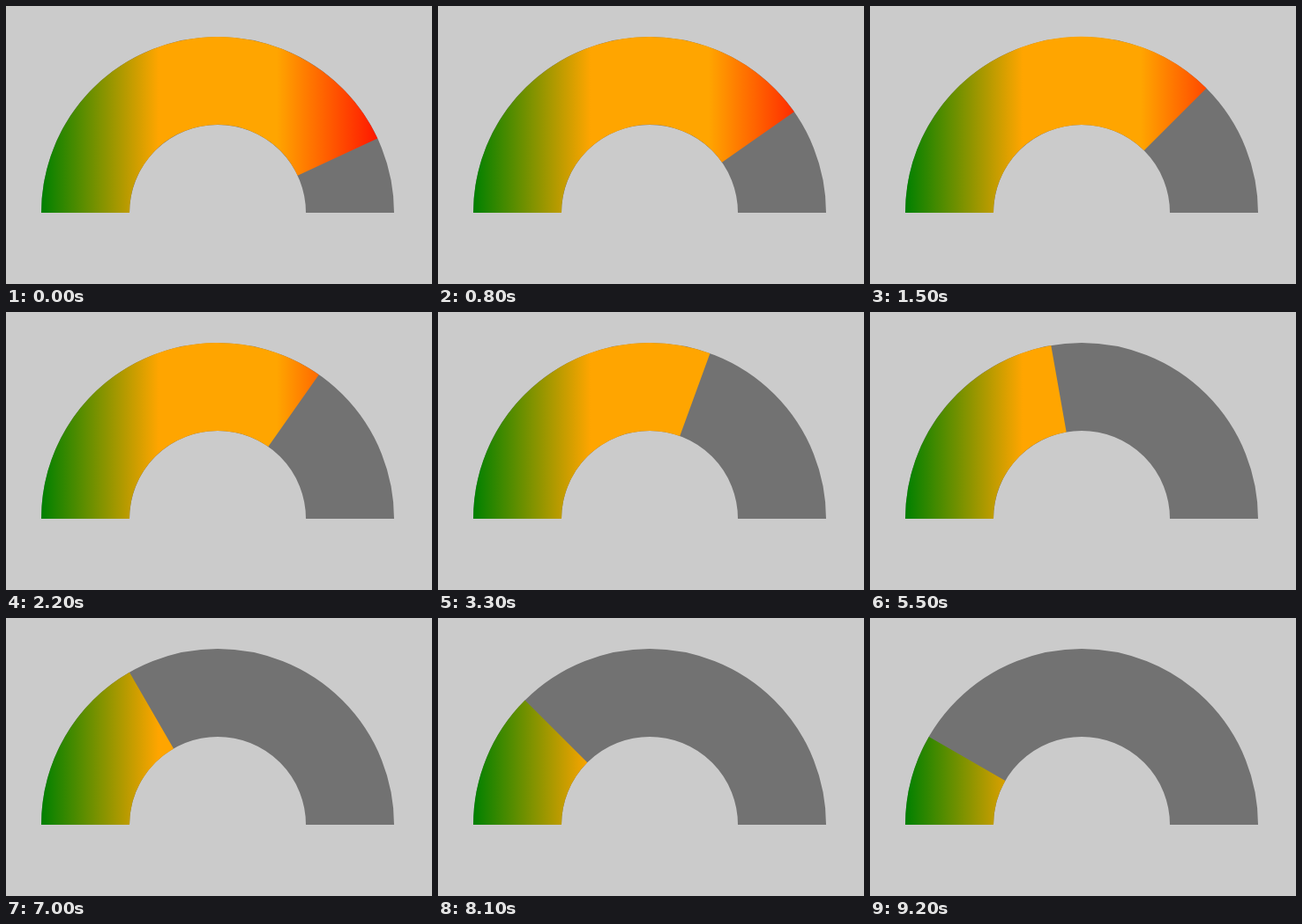
These frames come from a looping animation (483 px wide and 316 px high, 9400 ms). An HTML page:

```html
<!DOCTYPE html>
<html lang="en">
<head>
<meta charset="utf-8">
<title>Gauge</title>
<style>
  html, body { margin: 0; width: 100%; height: 100%; overflow: hidden; background: #cbcbcb; }
  svg { display: block; }
  path { fill: none; stroke-width: 100; }
</style>
</head>
<body>
<svg width="483" height="316" viewBox="0 0 483 316">
  <linearGradient id="heat" gradientUnits="userSpaceOnUse" x1="40" y1="0" x2="440" y2="0">
    <stop offset="0" stop-color="green"/>
    <stop offset=".333" stop-color="orange"/>
    <stop offset=".667" stop-color="orange"/>
    <stop offset="1" stop-color="red"/>
  </linearGradient>
  <path d="M90 235A150 150 0 0 1 390 235" stroke="#727272"/>
  <path id="value" stroke="url(#heat)"/>
</svg>
<script>
const LOOP = 9400, STEPS = 26;
const START_ANGLE = 155, STEP_ANGLE = 5;
const value = document.getElementById('value');

// Steps are 1100/3 ms apart, snapped to a 100 ms clock.
const stepTime = step => Math.round(step * 11 / 3) * 100;

function draw(now) {
  const time = now % LOOP;
  let step = 0;
  while (step + 1 < STEPS && stepTime(step + 1) <= time) step++;

  const angle = (START_ANGLE - STEP_ANGLE * step) * Math.PI / 180;
  const x = 240 - 150 * Math.cos(angle);
  const y = 235 - 150 * Math.sin(angle);
  value.setAttribute('d', `M90 235A150 150 0 0 1 ${x} ${y}`);
}

const start = performance.now();
function tick() {
  draw(performance.now() - start);
  requestAnimationFrame(tick);
}
tick();
</script>
</body>
</html>
```
